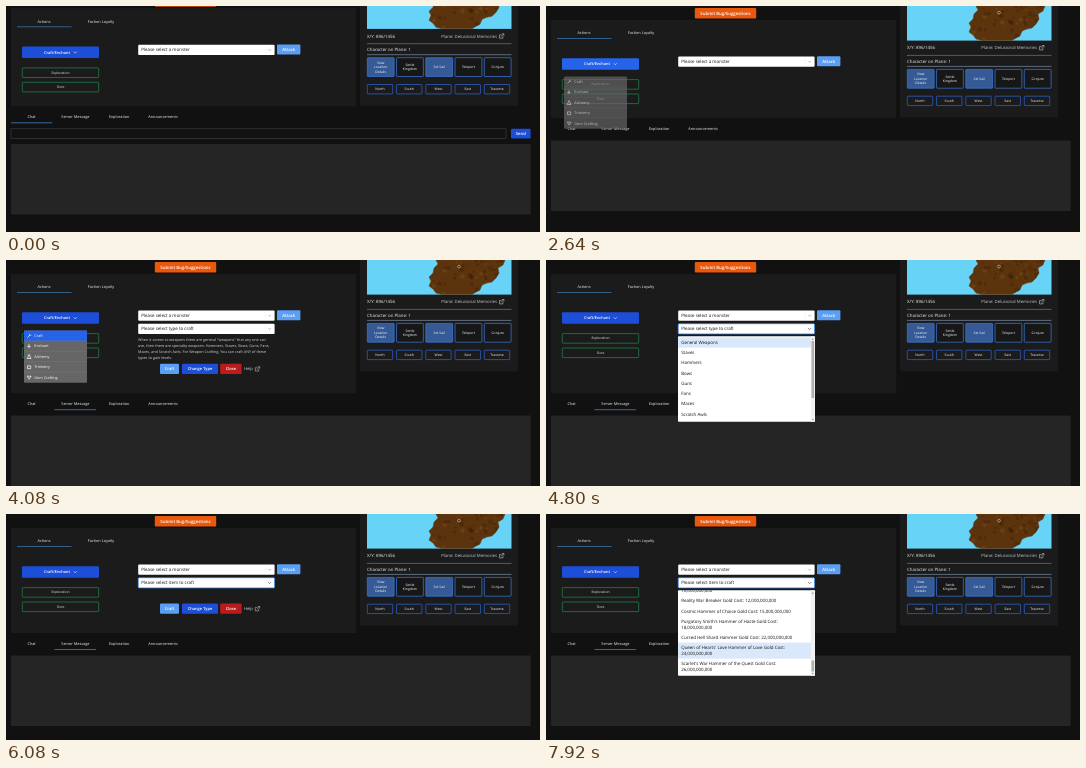
Recreate the animation shown at these times as an HTML page. Size 534 px wide and 226 px high, loop 8 s.

```html
<!DOCTYPE html>
<html lang="en">
<head>
<meta charset="utf-8">
<title>Crafting menu</title>
<style>
  html, body { margin: 0; width: 100%; height: 100%; overflow: hidden; background: #111; }
  svg { display: block; width: 100vw; height: 100vh; }
  text { font-family: "Open Sans", "Noto Sans", sans-serif; font-weight: 500; text-rendering: geometricPrecision; }
</style>
</head>
<body>
<svg id="stage" viewBox="0 0 534 226" preserveAspectRatio="none"></svg>
<script>
const LOOP = 8000;
const BLUE = '#1d4ed8', HOVER = '#2563eb', PALE = '#5b9ff5', INK = '#111', LIGHT = '#f0f0f0';

// Markup helpers
const rect = (x, y, w, h, fill, more = '') =>
  `<rect x="${x}" y="${y}" width="${w}" height="${h}" fill="${fill}" ${more}/>`;
const text = (x, y, str, size = 3.85, fill = LIGHT, more = '') =>
  `<text x="${x}" y="${y}" dy=".35em" font-size="${size}" fill="${fill}" ${more}>${str}</text>`;
const MID = 'text-anchor="middle"';
const BOLD = MID + ' style="font-weight:600"';
const mid = (x, y, str, size, fill) => text(x, y, str, size, fill, MID);
const path = (d, stroke, width = 0.6, fill = 'none', more = '') =>
  `<path d="${d}" stroke="${stroke}" stroke-width="${width}" fill="${fill}" ${more}/>`;
const group = (id, body, more = '') => `<g id="${id}" ${more}>${body}</g>`;
const button = (x, y, w, h, fill, label, size = 4) =>
  rect(x, y, w, h, fill, 'rx="1"') + text(x + w / 2, y + h / 2, label, size, '#fff', BOLD);
const outline = (x, y, w, h, stroke, fill = 'none') =>
  rect(x, y, w, h, fill, `rx=".6" stroke="${stroke}" stroke-width=".7"`);
const chevron = (x, y, color, more) => path(`M${x - 1.5} ${y - 0.7}l1.5 1.5 1.5-1.5`, color, 0.6, 'none', more);
const linkIcon = (x, y, color) =>
  path(`M${x + 2} ${y - 1.2}h-2v3.4h3.4v-2M${x + 2.4} ${y - 2.2}h2v2M${x + 4.2} ${y - 2}l-2.6 2.6`, color, 0.5);
const select = (y, label, name) =>
  rect(132.2, y, 136.4, 10.2, '#fff', 'rx="1"') + text(135.2, y + 5.1, label, 4.45, INK, `id="${name}Label"`) +
  path(`M259.4 ${y + 2}v6.2`, '#ddd', 0.3) + chevron(263.6, y + 5.1, '#999', `id="${name}Arrow"`);

// Right card: map, position, movement buttons
function mapCard() {
  let spots = '', seed = 7;
  const rnd = () => (seed = seed * 16807 % 2147483647) / 2147483647;
  for (let i = 0; i < 90; i++) {
    spots += `<circle cx="${424 + rnd() * 74}" cy="${rnd() * 34}" r="${0.4 + rnd() * 2}" fill="${
      rnd() < 0.65 ? '#3a1f06' : '#80501f'}" opacity=".4"/>`;
  }
  const island = 'M430 0L432 4 428 8 427 13 423 17 425 21 423 26 427 29 430 33 436 34.5H466L470 32 474 30 476 25 481 23 486 22 490 18 493 13 492 8 497 5 499 0Z';
  let out = rect(354, -5, 158, 116.4, '#1b1b1b', 'rx="1"') + rect(361, -2, 144.5, 36.6, '#66d3f7') +
    path(island, '#6e4218', 0.5, '#5b330d') + `<g clip-path="url(#land)">${spots}</g>` +
    '<circle cx="453" cy="6.6" r="1.4" fill="none" stroke="#d8c5a8" stroke-width=".6"/>' +
    text(361, 41.7, 'X/Y: 896/1456', 4.4) +
    text(491, 41.7, 'Plane: Delusional Memories', 4.3, '#c3c9d2', 'text-anchor="end"') +
    linkIcon(493.5, 41.7, '#dde1e8') +
    path('M361 49.4H505.5', '#999', 0.5) + path('M361 60.4H505.5', '#8a9fc0', 0.6) +
    text(361, 55, 'Character on Plane: 1', 4.4);
  const actions = [['View', 'Location', 'Details'], ['Settle', 'Kingdom'], ['Set Sail'], ['Teleport'], ['Conjure']];
  const ways = ['North', 'South', 'West', 'East', 'Traverse'];
  actions.forEach((lines, i) => {
    const x = 361.3 + i * 29.25, cx = x + 13.4;
    out += outline(x, 63.4, 26.8, 18.8, '#3b7be0', i % 2 || i === 4 ? '#171717' : '#365a96');
    lines.forEach((s, n) => out += mid(cx, 72.7 + (n - (lines.length - 1) / 2) * 4.5, s, 3.4, '#fff'));
    out += outline(x, 90.2, 25.4, 9.4, '#2f66d8') + mid(x + 12.7, 95, ways[i], 3.4, '#fff');
  });
  return `<clipPath id="land"><path d="${island}"/></clipPath>` + out;
}

const actionColumn = mid(38, 27, 'Actions') + mid(95, 27, 'Faction Loyalty') +
  path('M11 32.5H65.5', '#3f7fb8', 0.7) +
  rect(16, 52.3, 77, 11.5, BLUE, 'rx="1" id="craftBtn"') +
  text(51, 58, 'Craft/Enchant', 3.9, '#fff', BOLD) + chevron(69.3, 58, '#fff') +
  outline(16.3, 73.6, 76.4, 9.6, '#1f8a4a') + mid(54.5, 78.3, 'Exploration', 3.4) +
  outline(16.3, 88, 76.4, 9.6, '#1f8a4a') + mid(54.5, 92.8, 'Slots', 3.4) +
  select(50.5, 'Please select a monster', 'monster') + button(271, 50.3, 23.4, 10, PALE, 'Attack', 4.2);

const blurb = ['When it comes to weapons there are general "weapons" that any one can',
  'use, then there are specialty weapons: Hammers, Staves, Bows, Guns, Fans,',
  'Maces, and Scratch Awls. For Weapon Crafting, You can craft ANY of these',
  'types to gain levels.'];
const craftForm = select(63.7, '', 'craft') +
  rect(132.2, 63.7, 136.4, 10.2, 'none', 'rx="1" stroke="#2684ff" stroke-width=".7" id="focus"') +
  group('blurb', blurb.map((s, i) => text(132, 80 + i * 5.75, s, 3.75, '#d5d5d5')).join('')) +
  group('formBtns', button(154, 103.8, 19, 10.2, PALE, 'Craft') + button(176, 103.8, 36, 10.2, BLUE, 'Change Type') +
    button(214.2, 103.8, 21.4, 10.2, '#b91c1c', 'Close') + text(238, 108.9, 'Help', 4.1, '#c5d3e8') + linkIcon(249.3, 108.9, '#c5d3e8'));

const tabs = ['Chat', 'Server Message', 'Exploration', 'Announcements'];
const chat = tabs.map((s, i) => mid(25.6 + i * 43.8, 122.2, s)).join('') +
  path('M5 128.5H46.3', '#3b82c4', 0.8, 'none', 'id="tabLine"') +
  group('chatInput', rect(5, 134.5, 495, 9.6, '#121212', 'stroke="#4a4a4a" stroke-width=".5"') +
    button(505, 134.4, 19.6, 9.9, BLUE, 'Send', 4.2)) +
  rect(5, 134.4, 519.6, 70.6, '#252525', 'rx="1" id="log"');

const crafts = ['Craft', 'Enchant', 'Alchemy', 'Trinketry', 'Gem Crafting'];
const icons = ['M21.5 77.5l2.6-2.6M23 73.8l2 2', 'M23 73.6v4M21.4 76h3.2', 'M22.4 74h1.4v1.4l1.2 2.2h-3.8l1.2-2.2z',
  'M21.5 74.5h3.2v2.8h-3.2z', 'M21.3 74.4h3.8l-1.9 3z'];
const craftMenu = rect(18, 70.4, 63, 52.4, '#666', 'rx="1"') +
  rect(18, 70.6, 63, 10.2, HOVER, 'id="craftHover"') +
  crafts.map((s, i) => `<g transform="translate(0 ${i * 10.45})">${path(icons[i], '#fff', 0.7)}${
    text(28.3, 75.7, s, 3.8, '#fff')}${i ? path('M18 70.4H81', '#858585', 0.3) : ''}</g>`).join('');

// Option lists
const TOP = 76.3, VIEW = 85.5, PAD = 1.1, ROW = 10.22, LINE = 5.85, WRAP = 54;
function layout(labels) {
  let y = TOP + PAD;
  const rows = labels.map(label => {
    const cut = label.length > WRAP ? label.lastIndexOf(' ') : label.length;
    const lines = [label.slice(0, cut), label.slice(cut + 1)].filter(Boolean);
    const row = { y, lines, h: ROW + (lines.length - 1) * LINE };
    y += row.h;
    return row;
  });
  return { rows, max: y + PAD - TOP - VIEW };
}
const priced = list => list.map(([name, cost]) => `${name} Gold Cost: ${cost.toLocaleString('en-US')}`);
function hammers() {
  const kinds = ['Golden', 'Ancient', 'Burning', 'Frozen', 'Haunted', 'Runed'];
  const forms = ['Hammer', 'War Hammer of Dawn', 'Smith\'s Hammer of the Deep', 'Maul', 'Hammer of Sorrow', 'Hammer of the Fallen King'];
  const middle = Array.from({ length: 36 }, (_, i) => {
    const cost = 2000 * 4e6 ** (i / 36), unit = 10 ** Math.floor(Math.log10(cost));
    return [`${kinds[i / 6 | 0]} ${forms[i % 6]}`, Math.round(cost / unit) * unit];
  });
  return priced([['Broken Hammer', 10], ['Copper Hammer', 25], ['Iron Hammer', 75], ['Fated Hammer of the Stars', 200],
    ['Cleric\'s War Hammer of Devotion', 500], ['Blacksmith\'s Apprentice Silver Hammer', 750],
    ['Shadow War Hammer', 1000], ['Spiked Hammer of Blood', 1500], ...middle,
    ['Titan\'s Hammer of the Broken Heavens', 1e10], ['Reality War Breaker', 12e9], ['Cosmic Hammer of Choice', 15e9],
    ['Purgatory Smith\'s Hammer of Haste', 18e9], ['Cursed Hell Shard Hammer', 22e9],
    ['Queen of Hearts\' Love Hammer of Love', 24e9], ['Scarlet\'s War Hammer of the Quest', 26e9]]);
}
const lists = {
  type: layout(['General Weapons', 'Staves', 'Hammers', 'Bows', 'Guns', 'Fans', 'Maces', 'Scratch Awls']),
  item: layout(hammers())
};
const listRows = id => group(id, lists[id].rows.map(r =>
  r.lines.map((s, n) => text(135.2, r.y + 5.1 + n * LINE, s, 4.45, INK)).join('')).join(''));
const optionMenu = `<clipPath id="view">${rect(132, TOP, 137, VIEW, '#fff')}</clipPath>` +
  rect(132, TOP, 137, VIEW, '#fff', 'rx="1"') +
  `<g clip-path="url(#view)">${rect(132, 0, 133, 0, '#d9e8fa', 'id="optHover"')}${listRows('type')}${listRows('item')}</g>` +
  rect(264.8, TOP, 4, VIEW, '#f1f1f1') + rect(265.5, 81, 2.6, 57, '#b0b0b0', 'id="thumb"') +
  path('M265.8 79.4l1-1.2 1 1.2zM265.8 158.9l1 1.2 1-1.2z', 'none', 0, '#666');

const stage = document.getElementById('stage');
stage.innerHTML = group('page',
  button(148.8, 2, 61.4, 10.5, '#ea580c', 'Submit Bug/Suggestions', 4.3) +
  rect(5, 14, 345.3, 98, '#1b1b1b', 'rx="1" id="card"') + mapCard() + actionColumn +
  group('form', craftForm) + group('chat', chat) + group('craftMenu', craftMenu) + group('options', optionMenu));

const el = Object.fromEntries([...stage.querySelectorAll('[id]')].map(n => [n.id, n]));
const set = (id, name, value) => el[id].setAttribute(name, value);
const show = (id, on) => set(id, 'visibility', on ? 'inherit' : 'hidden');
const shift = (id, x, y) => set(id, 'transform', `translate(${x} ${y})`);
// Last value whose time has passed
const pick = (t, first, ...steps) => steps.reduce((v, [at, next]) => t >= at ? next : v, first);

function drawOptions(t, name) {
  const { rows, max } = lists[name];
  const isItem = name === 'item';
  const scroll = isItem ? max * pick(t, 0, [7200, 0.07], [7360, 0.22], [7440, 0.4], [7600, 0.64], [7760, 0.87], [7920, 1]) : 0;
  const pointer = isItem ? pick(t, 82, [7200, 136]) : pick(t, 82, [5360, 93], [5520, 103]);
  const hit = rows.find(r => pointer + scroll < r.y + r.h) || rows[0];
  show('type', !isItem);
  show('item', isItem);
  shift('item', 0, -scroll);
  set('optHover', 'y', hit.y - scroll);
  set('optHover', 'height', hit.h);
  set('thumb', 'height', isItem ? 11 : 57);
  set('thumb', 'y', 81 + (isItem ? 65.5 * scroll / max : 0));
}

function draw(t) {
  const onChat = t < 1280, itemStep = t >= 5840;
  const grow = pick(t, 0, [3840, 21.2], [5840, 7]);
  shift('page', 0, onChat ? -11.7 : 0);
  set('card', 'height', 98 + grow);
  shift('chat', 0, grow);
  shift('tabLine', onChat ? 0 : 43.5, 0);
  show('tabLine', onChat || t >= 3840);
  show('chatInput', onChat);
  set('log', 'y', onChat ? 149.7 : 134.4);

  set('craftBtn', 'fill', pick(t, BLUE, [2080, HOVER], [3120, BLUE]));
  set('craftMenu', 'opacity', pick(t, 0, [2400, 0.3], [2640, 0.7], [2800, 1], [4240, 0.5], [4480, 0]));
  show('craftHover', t >= 3360);

  show('form', t >= 3840);
  show('blurb', t >= 3840 && !itemStep);
  shift('formBtns', 0, itemStep ? -14.2 : 0);
  el.craftLabel.textContent = itemStep ? 'Please select item to craft' : 'Please select type to craft';
  show('focus', t >= 4800);
  set('craftArrow', 'stroke', t >= 4800 ? '#444' : '#999');

  const open = pick(t, '', [4800, 'type'], [5840, ''], [6480, 'item']);
  show('options', open);
  if (open) drawOptions(t, open);
  else ['type', 'item'].forEach(id => show(id, false));
}

const start = performance.now();
function tick() {
  draw((performance.now() - start) % LOOP);
  requestAnimationFrame(tick);
}
tick();
</script>
</body>
</html>
```
